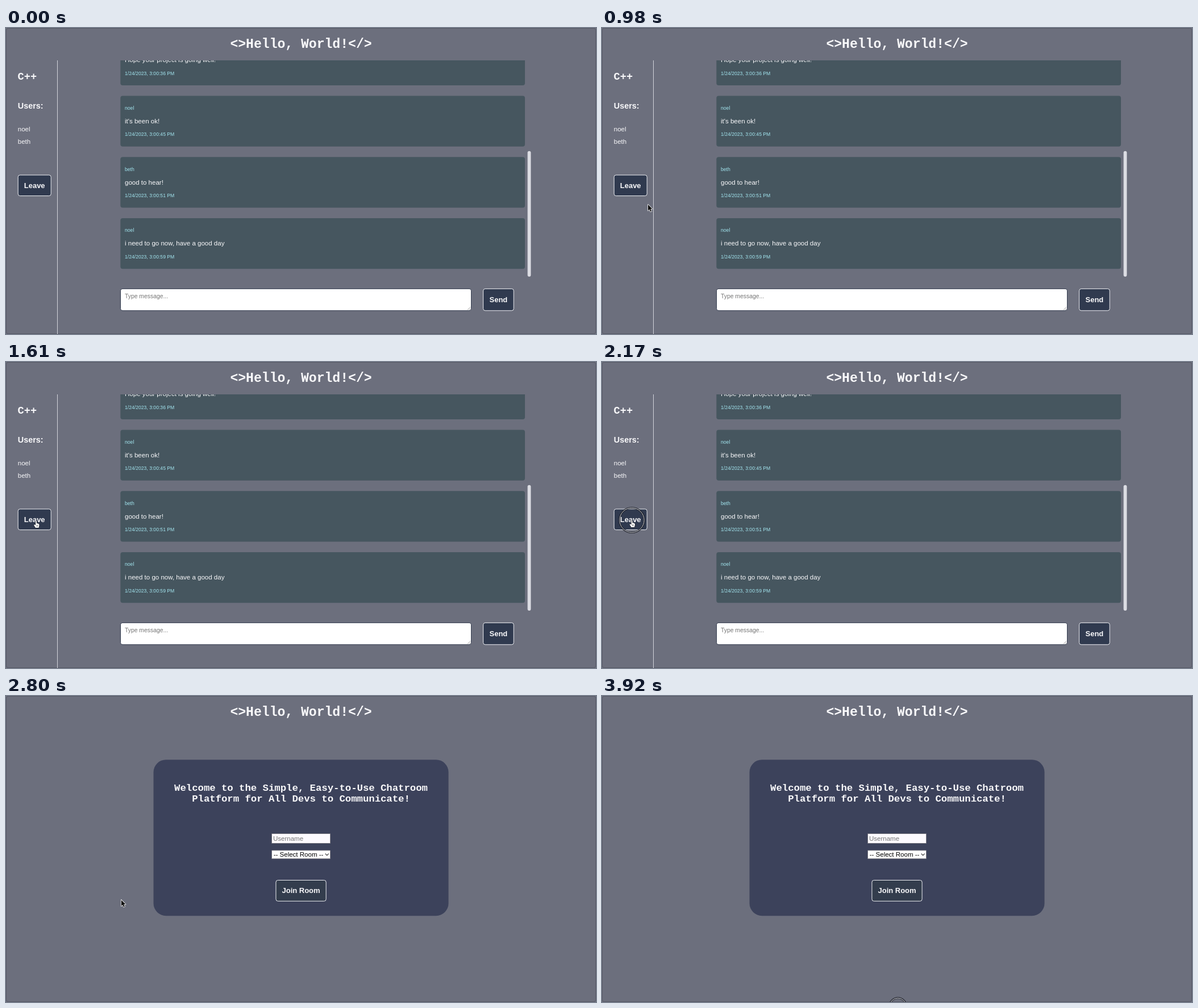
An HTML page with a canvas that plays this animation: 1038 by 539 pixels, repeating every 3.99 s.

```html
<!DOCTYPE html>
<html lang="en">
<head>
<meta charset="utf-8">
<title>Chatroom</title>
<style>
html, body { margin: 0; width: 100%; height: 100%; overflow: hidden; background: #6c6f7d; }
canvas { display: block; width: 1038px; height: 539px; }
</style>
</head>
<body>
<canvas id="stage" width="1038" height="539"></canvas>
<script>
const ctx = document.getElementById('stage').getContext('2d');
const W = 1038, H = 539;
const LOOP = 3990, STEP = 70;
const LEAVE_AT = 2310;
const SANS = '"Liberation Sans", Arial, sans-serif';
const MONO = '"Courier New", "Liberation Mono", monospace';
const WHITE = '#f8f8fa', CYAN = '#a2e4ee', BUTTON = '#303a4f';

const MESSAGES = [
  ['beth', 'Hope your project is going well!', '36'],
  ['noel', "it's been ok!", '45'],
  ['beth', 'good to hear!', '51'],
  ['noel', 'i need to go now, have a good day', '59']
];

// Pointer paths: time, x, y
const CHAT_PATH = [
  [70, 860, 472], [560, 329, 391], [630, 326.5, 379.5], [980, 81, 311],
  [1050, 81, 311], [1260, 66.5, 301], [1610, 53, 280], [1680, 52.5, 279]
];
const HOME_PATH = [[2310, 52, 277.5], [2590, 52, 277.5], [3150, 528.5, 535.5]];

function text(str, x, y, size, color = WHITE, { bold = false, family = SANS, align = 'left' } = {}) {
  ctx.font = `${bold ? 'bold ' : ''}${size}px ${family}`;
  ctx.fillStyle = color;
  ctx.textAlign = align;
  ctx.fillText(str, x, y);
}

function box(x, y, w, h, r, fill, stroke) {
  ctx.beginPath();
  ctx.roundRect(x, y, w, h, r);
  ctx.fillStyle = fill;
  ctx.fill();
  if (stroke) {
    ctx.strokeStyle = stroke;
    ctx.lineWidth = 1;
    ctx.stroke();
  }
}

function lines(points, color, width) {
  ctx.beginPath();
  points.forEach(([x, y], i) => i ? ctx.lineTo(x, y) : ctx.moveTo(x, y));
  ctx.strokeStyle = color;
  ctx.lineWidth = width;
  ctx.stroke();
}

function button(label, x, y, w, h, baseline, fill = BUTTON) {
  box(x, y, w, h, 3.5, fill, '#eeeff3');
  text(label, x + w / 2, baseline, 12.98, WHITE, { bold: true, align: 'center' });
}

function backdrop() {
  ctx.fillStyle = '#6c6f7d';
  ctx.fillRect(0, 0, W, H);
  ctx.beginPath();
  ctx.roundRect(0.5, 0.5, W - 1, H - 1, 3);
  ctx.strokeStyle = 'rgba(50,52,64,0.4)';
  ctx.lineWidth = 1;
  ctx.stroke();
  text('<>Hello, World!</>', 519, 35, 23.07, WHITE, { bold: true, family: MONO, align: 'center' });
}

function message([user, body, sec], i) {
  const y = 11.7 + i * 107.75;
  box(201.3, y, 711.7, 89.4, 4, '#46565f');
  text(user, 209, y + 24.3, 8.65, CYAN);
  text(body, 209, y + 48.4, 11.53);
  text(`1/24/2023, 3:00:${sec} PM`, 209, y + 70.8, 8.65, CYAN);
}

function chat() {
  text('C++', 20.6, 91, 18.6, WHITE, { bold: true, family: MONO });
  text('Users:', 20.8, 142, 14.42, WHITE, { bold: true });
  text('noel', 20.8, 181.8, 11.53);
  text('beth', 20.8, 203.8, 11.53);
  button('Leave', 21.2, 259, 58, 36.6, 281.6);
  lines([[90.5, 57], [90.5, H]], '#d3d4da', 1);

  ctx.save();
  ctx.beginPath();
  ctx.rect(195, 57, 735, 400);
  ctx.clip();
  MESSAGES.forEach(message);
  ctx.restore();
  box(917.6, 216.7, 5.8, 221.3, 2.9, '#dcdde3');

  box(201.5, 459.4, 617, 38.4, 3.5, '#fff', '#343c4f');
  text('Type message...', 209, 476.2, 10.38, '#757575');
  lines([[812, 496.5], [817, 491.5]], '#777', 0.7);
  lines([[815, 496.5], [817, 494.5]], '#777', 0.7);
  button('Send', 839.6, 459.4, 53.6, 38.4, 483);
}

function home() {
  const heading = { bold: true, family: MONO, align: 'center' };
  box(259.5, 112.2, 519, 275, 22, '#3c425b');
  text('Welcome to the Simple, Easy-to-Use Chatroom', 519, 166.6, 17.3, WHITE, heading);
  text('Platform for All Devs to Communicate!', 519, 186.2, 17.3, WHITE, heading);

  box(467.5, 242.5, 103, 17, 0.5, '#fcfafe', '#77777f');
  text('Username', 470, 255, 11.53, '#757575');
  box(467.5, 271.9, 103, 14.8, 0.5, '#fff', '#77777f');
  text('-- Select Room --', 470.7, 283.4, 11.53, '#000');
  lines([[561.8, 277.7], [564.7, 280.8], [567.6, 277.7]], '#222', 1.1);
  button('Join Room', 474.9, 324.5, 88.2, 36.8, 347.4, '#333d4d');
}

// Eases through a pause-free path, one smooth segment at a time
function along(path, t) {
  const next = path.findIndex(p => p[0] > t);
  if (next < 0) return path[path.length - 1].slice(1);
  const [t0, x0, y0] = path[next - 1], [t1, x1, y1] = path[next];
  const u = (t - t0) / (t1 - t0), e = u * u * (3 - 2 * u);
  return [x0 + (x1 - x0) * e, y0 + (y1 - y0) * e];
}

const ARROW = new Path2D('M0 0V10.8L2.5 8.5L4.2 12.5L6.1 11.7L4.4 7.8H7.7Z');
const HAND = new Path2D(
  'M-.9 .9Q-.9 0 0 0Q.9 0 .9 .9V4.2Q2 3.5 2.6 4.6Q3.8 4.1 4.1 5.2Q5.4 5 5.4 6.4' +
  'V8.2Q5.2 10 4.4 12H-1Q-2.2 9.8-3.8 7.7Q-4 6-2.6 6.2L-.9 7.4Z');

function pointer(x, y, hand) {
  ctx.save();
  ctx.translate(x, y);
  ctx.lineJoin = 'round';
  ctx.lineWidth = hand ? 0.9 : 1.5;
  ctx.strokeStyle = hand ? '#111' : '#fff';
  ctx.fillStyle = hand ? '#fff' : '#111';
  const shape = hand ? HAND : ARROW;
  ctx.stroke(shape);
  ctx.fill(shape);
  if (hand) {
    lines([[0.9, 7], [0.9, 10]], '#333', 0.6);
    lines([[2.7, 7], [2.7, 10]], '#333', 0.6);
  }
  ctx.restore();
}

function ring(x, y, r) {
  const stroke = (radius, color, width) => {
    ctx.beginPath();
    ctx.arc(x, y, radius, 0, Math.PI * 2);
    ctx.strokeStyle = color;
    ctx.lineWidth = width;
    ctx.stroke();
  };
  stroke(r - 1.6, 'rgba(28,30,38,0.85)', 3.2);
  stroke(r - 1.7, '#c9cbd0', 1);
}

const overButton = (x, y) =>
  (x > 21 && x < 80 && y > 258 && y < 296) || (x > 839 && x < 894 && y > 459 && y < 498);

function draw(t) {
  backdrop();
  if (t < LEAVE_AT) {
    chat();
    if (t >= 70) {
      const [x, y] = along(CHAT_PATH, t);
      pointer(x, y, overButton(x, y));
    }
    if (t >= 2170) ring(52.5, 278.5, 23.3);
  } else {
    home();
    if (t < 3220) pointer(...along(HOME_PATH, t), false);
    if (t >= 3920) ring(520.5, 546.5, 16.2);
  }
}

function tick() {
  const t = performance.now() % LOOP;
  draw(Math.floor(t / STEP) * STEP);
  requestAnimationFrame(tick);
}
tick();
</script>
</body>
</html>
```
